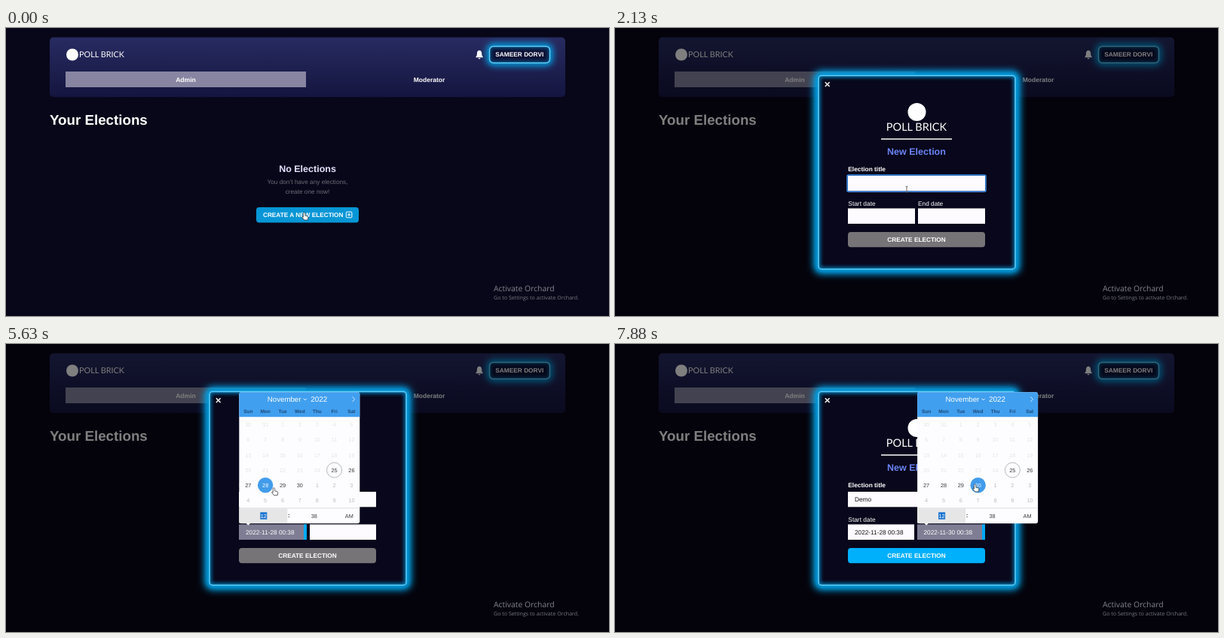
Recreate the animation shown at these times as an HTML page. Size 800 px wide and 384 px high, loop 8000 ms.

```html
<!DOCTYPE html>
<html lang="en">
<head>
<meta charset="utf-8">
<title>New election</title>
<style>
html, body { margin: 0; width: 100%; height: 100%; overflow: hidden; background: #080719; }
svg { display: block; width: 100%; height: 100%; }
text { font-family: "Liberation Sans", Arial, sans-serif; text-rendering: geometricPrecision; white-space: pre; }
.b { font-weight: bold; }
.m { text-anchor: middle; }
.logo { font-family: Lato, sans-serif; }
.sys { font-family: "Open Sans", sans-serif; }
</style>
</head>
<body>
<svg id="stage" viewBox="0 0 800 384">
  <defs>
    <linearGradient id="panel" x2="0" y2="1">
      <stop stop-color="#282b61"/><stop offset="1" stop-color="#14153f"/>
    </linearGradient>
    <filter id="soft" x="-40%" y="-60%" width="180%" height="220%"><feGaussianBlur stdDeviation="5"/></filter>
    <filter id="tight" x="-20%" y="-60%" width="140%" height="220%"><feGaussianBlur stdDeviation="2.5"/></filter>
  </defs>
</svg>
<script>
const LOOP = 8000, STEP = 125;
const BRAND = "POLL BRICK", USER = "SAMEER DORVI", SYSTEM = "Orchard";
const stage = document.getElementById("stage");

const text = (s, x, y, size, fill = "#fff", cls = "", extra = "") =>
  `<text x="${x}" y="${y}" font-size="${size}" fill="${fill}" class="${cls}" ${extra}>${s}</text>`;
const rect = (x, y, w, h, fill, r = 0, extra = "") =>
  `<rect x="${x}" y="${y}" width="${w}" height="${h}" fill="${fill}" rx="${r}" ${extra}/>`;
const line = (d, color, width = 1, extra = "") =>
  `<path d="${d}" fill="none" stroke="${color}" stroke-width="${width}" ${extra}/>`;
const group = (id, ...parts) => `<g id="${id}">${parts.join("")}</g>`;

// Box with a neon edge: wide halo outside, narrow one inside
const neon = (x, y, w, h, r, fill, halo) =>
  rect(x, y, w, h, "none", r, `stroke="#00aef5" stroke-width="${halo}" filter="url(#soft)"`) +
  rect(x, y, w, h, fill, r) +
  rect(x, y, w, h, "none", r, `stroke="#008fd0" stroke-width="${halo / 3}" filter="url(#tight)"`) +
  rect(x, y, w, h, "none", r, 'stroke="#62d0f8" stroke-width="1.5"');

const ring = (id, x, y, w, h) =>
  rect(x, y, w, h, "none", 2, `id="${id}" stroke="#3d92f2" stroke-width="1.5"`);

function page() {
  return rect(58, 12.5, 684, 79.5, "url(#panel)", 5) +
    '<circle cx="88" cy="35.5" r="8" fill="#fff"/>' +
    text(BRAND, 97, 39, 10.8, "#fff", "logo") +
    '<path d="M628 29.7c-2.4.5-3.1 2.1-3.1 4.2 0 2.3-.5 3.4-1.6 4.6v.7h9.6v-.7c-1.1-1.2-1.7-2.3-1.7-4.6 0-2.1-.8-3.7-3.2-4.2zM626.6 40h2.8c0 1.9-2.8 1.9-2.8 0z" fill="#fff"/>' +
    neon(641.5, 24.5, 80, 22, 5, "#0d1136", 7) +
    text(USER, 681.3, 38.3, 8.3, "#fff", "b m") +
    rect(79, 58, 319, 21, "#8785a1") +
    text("Admin", 238.5, 71.7, 8.6, "#fff", "b m") +
    text("Moderator", 561.5, 71.7, 8.5, "#fff", "b m") +
    text("Your Elections", 58, 128.5, 18.74, "#fff", "b") +
    text("No Elections", 400, 192, 12.5, "#e3e2ff", "b m") +
    text("You don’t have any elections,", 400, 208, 8.25, "#6d6c78", "m") +
    text("create one now!", 400, 220.5, 8.25, "#6d6c78", "m") +
    rect(332, 239, 136, 20.5, "#0796d6", 4) +
    text("CREATE A NEW ELECTION", 394.2, 252, 8.25, "#fff", "b m") +
    rect(451.3, 245.2, 7.6, 7.6, "none", 1, 'stroke="#fff"') +
    line("M453 249h4.2m-2.1-2.1v4.2", "#fff");
}

function modal() {
  return neon(270, 63.5, 261, 258, 4, "#08071b", 13) +
    line("M278.8 72.3l5.8 5.8m0-5.8l-5.8 5.8", "#fff", 1.4) +
    '<circle cx="400.5" cy="112" r="12" fill="#fff"/>' +
    text(BRAND, 400, 136.5, 14.5, "#fff", "logo m") +
    rect(353, 147.3, 94, 1.5, "#fff") +
    text("New Election", 400, 169.3, 12.5, "#6a84f6", "b m") +
    text("Election title", 309.3, 191, 8.35, "#fff", "b") +
    rect(309, 197, 182, 20.3, "#fdfbff") +
    ring("titleRing", 308, 196, 184, 22.3) +
    text("", 318, 209.5, 8.3, "#111", "", 'id="title"') +
    text("Start date", 309.3, 236.6, 8.4) +
    text("End date", 402, 236.6, 8.3, "#fff", "", 'id="endLabel"') +
    rect(309, 240.5, 89, 20.5, "#fdfbff", 0, 'id="start"') +
    rect(402, 240.5, 89, 20.5, "#fdfbff", 0, 'id="end"') +
    group("startActive", rect(395, 240.5, 4, 20.5, "#00aaf5")) +
    ring("startRing", 308, 239.7, 91.8, 22.3) +
    group("endActive", rect(487, 240.5, 4, 20.5, "#00aaf5")) +
    ring("endRing", 400.2, 239.7, 91.8, 22.3) +
    text("2022-11-28 00:38", 318, 253.5, 8.25, "#111", "", 'id="startValue"') +
    text("2022-11-30 00:38", 409.5, 253.5, 8.25, "#fff", "", 'id="endValue"') +
    rect(309, 272, 182, 20.3, "#767477", 4, 'id="create"') +
    text("CREATE ELECTION", 400, 284.7, 8.27, "#fff", "b m");
}

// Date picker at the origin; `pick` is the day that gets chosen
function calendar(id, pick) {
  const column = i => 12 + 22.85 * i;
  let days = "";
  for (let n = 0; n < 42; n++) {
    const day = n - 1, x = column(n % 7), y = 43.2 + 20.2 * Math.floor(n / 7);
    const label = day < 1 ? day + 31 : day > 30 ? day - 30 : day;
    const color = day < 25 ? "#e4e4e7" : day > 30 ? "#bcbcc0" : "#393939";
    if (day === 25) days += `<circle cx="${x}" cy="${y}" r="10" fill="none" stroke="#b4b8be"/>`;
    days += text(label, x, y + 2.7, 7.3, color, "m");
    if (day === pick) days += group(id + "Pick",
      `<circle cx="${x}" cy="${y}" r="10.2" fill="#429ceb"/>`, text(label, x, y + 2.7, 7.3, "#fff", "m"));
  }
  const week = ["Sun", "Mon", "Tue", "Wed", "Thu", "Fri", "Sat"]
    .map((d, i) => text(d, column(i), 27.6, 6.5, "#1d4a78", "b m")).join("");
  return group(id,
    rect(0, 0, 160, 175, "#fdfdff", 3),
    '<path d="M9 174.5h6l-3 3z" fill="#fdfdff"/>',
    '<path d="M0 33V3q0-3 3-3h154q3 0 3 3v30z" fill="#419fef"/>',
    text("November", 37.5, 13, 9.7), text("2022", 95, 13, 9.9),
    line("M85.5 8.5l2 2 2-2", "#fff"), line("M150.3 6l3 3.3-3 3.3", "#d5eaff"),
    week, days,
    rect(0, 154, 160, 1, "#dedee2"),
    group(id + "Minute", rect(68, 155, 64, 19.5, "#e6e6e6"),
      '<path d="M125.5 160h4l-2-2.6zM125.5 169h4l-2 2.6z" fill="#555"/>'),
    text("12", 32.5, 167.7, 7.3, "#393939", "b m"),
    group(id + "Hour", rect(0, 155, 64, 19.5, "#e6e6e6"), rect(28, 160, 9, 9.5, "#1c74d0"),
      text("12", 32.5, 167.7, 7.3, "#fff", "m")),
    text(":", 66, 167.2, 8, "#393939", "b m"),
    text("38", 99.5, 167.7, 7.3, "#393939", "m"),
    text("AM", 146, 167.3, 7.3, "#393939", "m"));
}

const cursor = group("cursor",
  group("hand", '<path d="M.6 0c1 0 1.2.8 1.2 1.5v2.7l3.2.7q1.1.4.9 2l-.6 3.1H.6l-2.8-3.8q.1-1.1 1.1-.5l.5.5V1.4C-.6.6-.3 0 .6 0z" fill="#fff" stroke="#222" stroke-width=".7"/>'),
  group("beam", line("M-1.5.3h3M0 .3v7.4M-1.5 7.7h3", "#777", 1.1)));

stage.insertAdjacentHTML("beforeend",
  page() + rect(0, 0, 800, 384, "#000", 0, 'id="shade"') + group("modal", modal()) +
  calendar("calA", 28) + calendar("calB", 30) +
  text("Activate " + SYSTEM, 647, 351, 10.4, "#85868d", "sys") +
  text(`Go to Settings to activate ${SYSTEM}.`, 647, 362.3, 7.1, "#77787f", "sys") +
  cursor);

const el = {};
stage.querySelectorAll("[id]").forEach(e => el[e.id] = e);
const set = (id, attrs) => { for (const k in attrs) el[id].setAttribute(k, attrs[k]); };
const show = (id, on) => set(id, { visibility: on ? "inherit" : "hidden" });
const clamp = x => Math.min(1, Math.max(0, x));

// Pointer moves: start, end, x, y of the tip at the end
const MOVES = [[0, 1, 395, 246], [1000, 1600, 387, 211], [4600, 5050, 344, 186],
  [5500, 6150, 456, 245.5], [6700, 7250, 477, 187]];
const T = { modal: 150, focus: 1700, type: 2800, calA: 4060, pickA: 5250, calB: 6350, pickB: 7400 };

function pointer(t) {
  let [, , x, y] = MOVES[0];
  for (const [a, b, tx, ty] of MOVES) {
    const u = clamp((t - a) / (b - a)), p = u * u * (3 - 2 * u);
    x += (tx - x) * p;
    y += (ty - y) * p;
  }
  return [x, y];
}

function picker(id, x, t, opened, closed) {
  const p = 1 - (1 - clamp((t - opened) / 300)) ** 5;
  show(id, t >= opened && t < closed);
  set(id, { opacity: p, transform: `translate(${x} ${64.3 - 10.4 * (1 - p)})` });
}

function draw(t) {
  const fade = clamp((t - T.modal) / 200);
  const inA = t >= T.calA && t < T.calB, inB = t >= T.calB;
  const pickedA = t >= T.pickA, pickedB = t >= T.pickB;
  set("shade", { opacity: fade * 0.5 });
  set("modal", { opacity: fade });

  show("titleRing", t >= T.focus && t < T.calA);
  el.title.textContent = "Demo".slice(0, Math.max(0, Math.ceil((t - T.type) / 150)));

  const endX = inB ? 401 : inA ? 403 : 402;
  set("start", { width: inB ? 88 : inA ? 90 : 89, fill: inA ? "#7f7d93" : "#fdfbff" });
  set("end", { x: endX, width: 491 - endX, fill: inB ? "#7f7d93" : "#fdfbff" });
  set("endLabel", { x: inB ? 401 : 402 });
  set("startValue", { fill: inA ? "#fff" : "#111" });
  show("startActive", inA);
  show("endActive", inB);
  show("startRing", inA && !pickedA);
  show("endRing", inB && !pickedB);
  show("startValue", pickedA);
  show("endValue", pickedB);
  set("create", { fill: pickedB ? "#00b0fb" : "#767477" });

  picker("calA", 309.3, t, T.calA, T.calB);
  picker("calB", 401.1, t, T.calB, LOOP);
  for (const [id, on] of [["calA", pickedA], ["calB", pickedB]]) {
    show(id + "Pick", on);
    show(id + "Hour", on);
  }
  show("calAMinute", t < 4700);
  show("calBMinute", false);

  const [x, y] = pointer(t), beam = t >= 1450 && t < 4700;
  set("cursor", { transform: `translate(${x} ${y})` });
  show("beam", beam);
  show("hand", !beam);
}

// The screen is refreshed eight times a second
function tick() {
  draw(Math.floor(performance.now() % LOOP / STEP) * STEP);
  requestAnimationFrame(tick);
}
tick();
</script>
</body>
</html>
```
